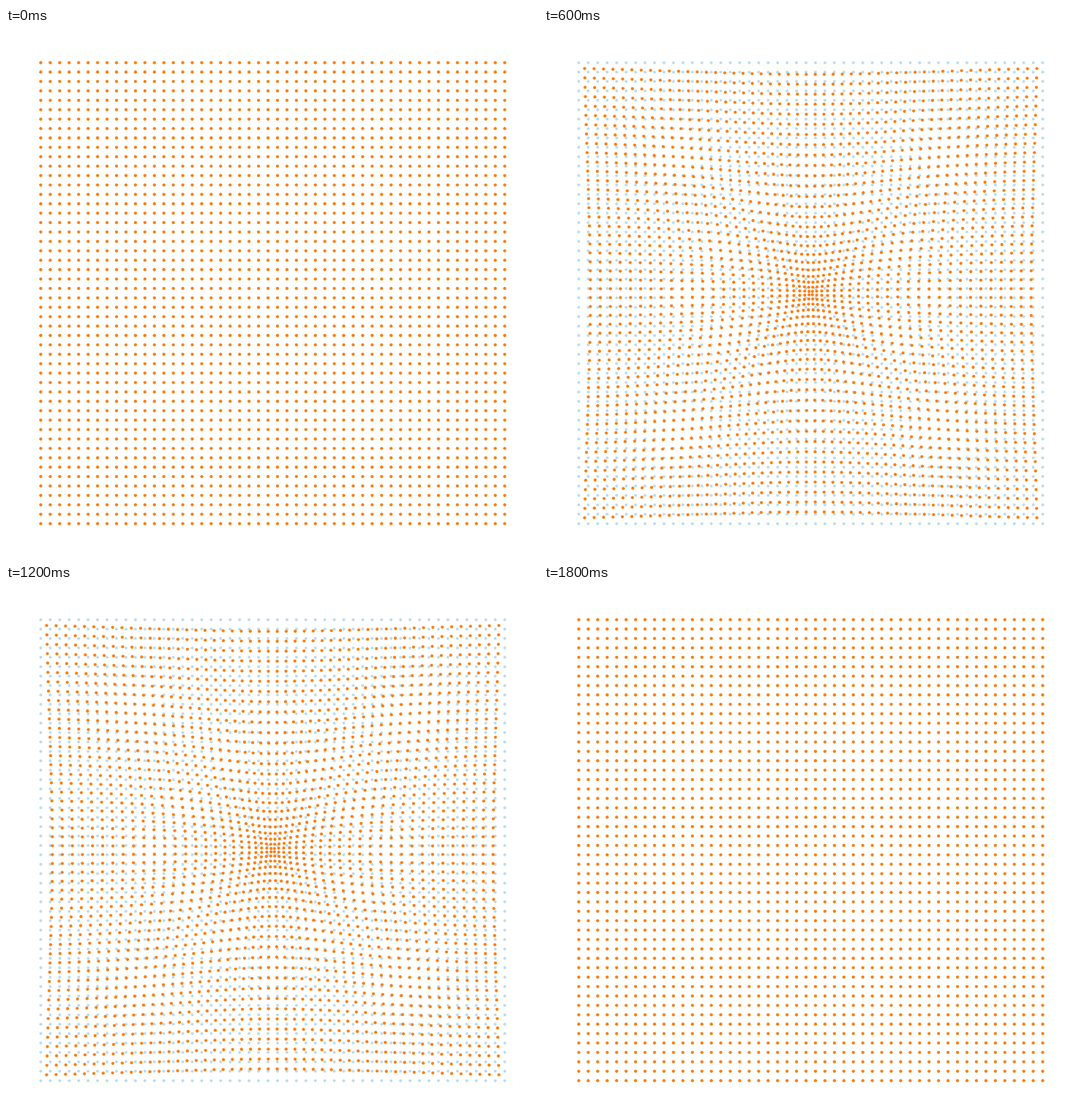
An HTML page with a canvas for the animation above (2 s loop, 727 by 723 pixels).

```html
<!DOCTYPE html>
<html lang="en">
<head>
<meta charset="utf-8">
<title>Contracting point grid</title>
<style>
html, body { margin: 0; width: 100%; height: 100%; overflow: hidden; background: #fff; }
canvas { display: block; }
</style>
</head>
<body>
<canvas id="stage" width="727" height="723"></canvas>
<script>
const ctx = document.getElementById('stage').getContext('2d');
const N = 50, CX = 364.5, CY = 362.4, DX = 634 / 49, DY = 630 / 49;
const STEP = 100, LOOP = 2000, TURN = 9;
const PULL = 840, CORE = 99.5, POWER = 1.9;

// Pull toward the centre: soft inside the core, fading as 1/r outside.
const points = [];
for (let j = 0; j < N; j++) {
  for (let i = 0; i < N; i++) {
    const x = (i - (N - 1) / 2) * DX;
    const y = (j - (N - 1) / 2) * DY;
    const r = Math.hypot(x, y);
    const inside = 1 - Math.exp(-Math.pow(r / CORE, POWER));
    points.push({ x, y, pull: PULL * inside / (r * r) });
  }
}

function drawDots(color, radius, amount) {
  ctx.fillStyle = color;
  for (const p of points) {
    const s = 1 - amount * p.pull;
    ctx.beginPath();
    ctx.arc(CX + p.x * s, CY + p.y * s, radius, 0, Math.PI * 2);
    ctx.fill();
  }
}

let shown = -1;
function frame() {
  const step = Math.floor(performance.now() % LOOP / STEP);
  const amount = Math.max(0, TURN - Math.abs(step - TURN));
  if (amount !== shown) {
    shown = amount;
    ctx.fillStyle = '#fff';
    ctx.fillRect(0, 0, 727, 723);
    drawDots('#bcdcee', 2, 0);
    drawDots('#ff7f0e', 2.15, amount);
  }
  requestAnimationFrame(frame);
}
frame();
</script>
</body>
</html>
```
